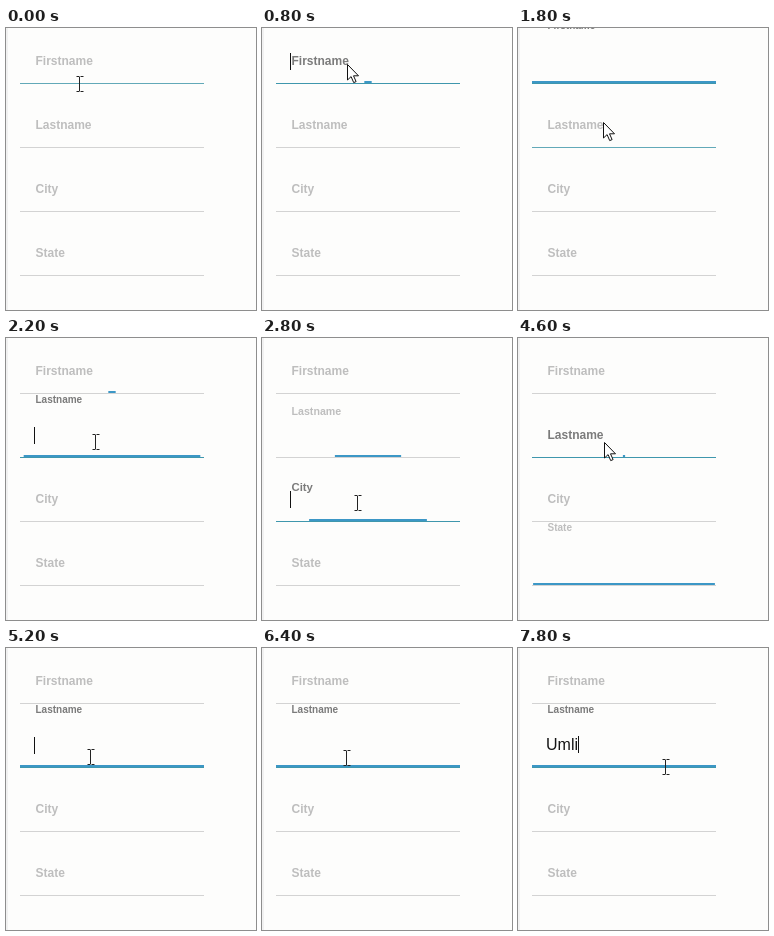
Write an HTML page that moves like this. It is 250x282 px and loops after 8000 ms.

```html
<!DOCTYPE html>
<html lang="en">
<head>
<meta charset="utf-8">
<title>Floating label form</title>
<style>
  html, body { margin: 0; width: 100%; height: 100%; overflow: hidden; background: #fdfdfc; }
  svg { display: block; width: 100vw; height: 100vh; }
  text { font-family: "Liberation Sans", Arial, sans-serif; }
  .label { font-weight: bold; fill: #bebebe; }
  .focused .label { fill: #7b7b7b; }
  .line { fill: #d3d3d3; }
  .hovered .line { fill: #62a9b8; }
  .focused .line { fill: #3f97ad; }
  .bar { fill: #3c97c6; }
  .value { font-size: 16px; fill: #151515; }
  #arrow { fill: #fff; stroke: #111; }
  #beam { fill: none; stroke: #222; }
</style>
</head>
<body>
<svg viewBox="0 0 250 282">
  <rect width="250" height="282" fill="#fdfdfc"/>
  <rect width="2" height="282" fill="#f1f1f1"/>
  <g id="form"></g>
  <text id="typed" class="value" x="28" y="102"></text>
  <rect id="caret" width="1" height="17" fill="#111"/>
  <path id="arrow" d="M.5 .5v15.5l3.6-3.4 2.6 6 2.4-1-2.6-5.8h5z"/>
  <path id="beam" d="M-3.5 -7.5h3M.5 -7.5h3M-.5 -7v14M-3.5 7.5h3M.5 7.5h3"/>
</svg>
<script>
const LOOP = 8000, STEP = 200, EASE_MS = 250, BLINK_MS = 530;
const PITCH = 64, LEFT = 14, WIDTH = 184, RISE = 36.3;

// A click focuses a field and blurs the one before it.
const clicks = [
  { at: 790, field: 0 },
  { at: 1960, field: 1 },
  { at: 2640, field: 2 },
  { at: 3592, field: 3 },
  { at: 4597, field: 1, blinkFrom: 4710 }
];

// Pointer path: time, x, y
const path = [
  [0, 73, 56], [400, 84, 42], [800, 86, 36], [1200, 86, 38], [1600, 86, 88],
  [1800, 86, 94], [2100, 88, 98], [2400, 92, 117], [2600, 95, 150],
  [2800, 95, 165], [3200, 94, 173], [3400, 93, 215], [3800, 92, 225],
  [4200, 91, 218], [4500, 88, 103], [5200, 84, 109], [6000, 84, 110],
  [6700, 84, 110], [7400, 147, 119], [8000, 147, 119]
];

const typing = [[7200, "U"], [7400, "Um"], [7800, "Umli"]];

const $ = id => document.getElementById(id);
const clamp = v => Math.max(0, Math.min(1, v));
const mix = (a, b, k) => a + (b - a) * k;
const lift = p => clamp((p - 0.49) / 0.45);

function add(parent, tag, attrs) {
  const node = document.createElementNS("http://www.w3.org/2000/svg", tag);
  set(node, attrs);
  return parent.appendChild(node);
}

function set(node, attrs) {
  for (const key in attrs) node.setAttribute(key, attrs[key]);
}

const fields = ["Firstname", "Lastname", "City", "State"].map((name, i) => {
  const group = add($("form"), "g", {});
  const lineY = 55 + i * PITCH;
  const line = { class: "line", x: LEFT, y: lineY, width: WIDTH, height: 1 };
  add(group, "rect", line);
  const bar = add(group, "rect", { class: "bar", y: lineY - 2, height: 2 });
  const label = add(group, "text", { class: "label", x: 29.5 });
  label.textContent = name;
  return { group, bar, label, restY: 37 + i * PITCH };
});

function pointerAt(t) {
  const next = Math.max(1, path.findIndex(point => point[0] > t));
  const [t0, x0, y0] = path[next - 1], [t1, x1, y1] = path[next];
  const k = (t - t0) / (t1 - t0);
  return { x: Math.round(mix(x0, x1, k)), y: Math.round(mix(y0, y1, k)) };
}

function drawField(field, { bar, up, focused, hovered }) {
  const width = WIDTH * bar;
  set(field.bar, { x: LEFT + (WIDTH - width) / 2, width });
  set(field.label, { y: field.restY - RISE * up, "font-size": mix(12, 10, up) });
  field.group.classList.toggle("focused", focused);
  field.group.classList.toggle("hovered", hovered);
}

function draw(t) {
  const past = clicks.filter(click => click.at <= t);
  const now = past[past.length - 1], before = past[past.length - 2];
  const p = now ? clamp((t - now.at) / EASE_MS) : 0;
  const { x, y } = pointerAt(t);
  const over = Math.floor((y + 2) / PITCH);
  let overLabel = false;

  fields.forEach((field, i) => {
    const focused = !!now && now.field === i;
    const leaving = !!before && before.field === i;
    const bar = focused ? p : leaving ? 1 - p : 0;
    const up = focused ? lift(p) : leaving ? 1 - lift(p) : 0;
    drawField(field, { bar, up, focused, hovered: over === i });
    const middle = field.restY - 4 - RISE * up;
    if (x < 88 && Math.abs(y - middle) < 8) overLabel = true;
  });

  const typed = typing.filter(([at]) => at <= t).pop();
  $("typed").textContent = typed ? typed[1] : "";

  let caretOn = false;
  if (now) {
    const phase = Math.floor((t - (now.blinkFrom || now.at)) / BLINK_MS);
    caretOn = !!typed || phase % 2 === 0;
    const textWidth = typed ? $("typed").getComputedTextLength() : 0;
    set($("caret"), {
      x: 28 + Math.round(textWidth),
      y: 25 + now.field * PITCH - (typed ? 1 : 0)
    });
  }
  $("caret").style.display = caretOn ? "" : "none";

  $("arrow").style.display = overLabel ? "" : "none";
  $("beam").style.display = overLabel ? "none" : "";
  set($("arrow"), { transform: `translate(${x - 1} ${y})` });
  set($("beam"), { transform: `translate(${x + 1} ${y})` });
}

const start = performance.now();
function tick() {
  const t = (performance.now() - start) % LOOP;
  draw(Math.floor(t / STEP) * STEP);
  requestAnimationFrame(tick);
}
tick();
</script>
</body>
</html>
```
